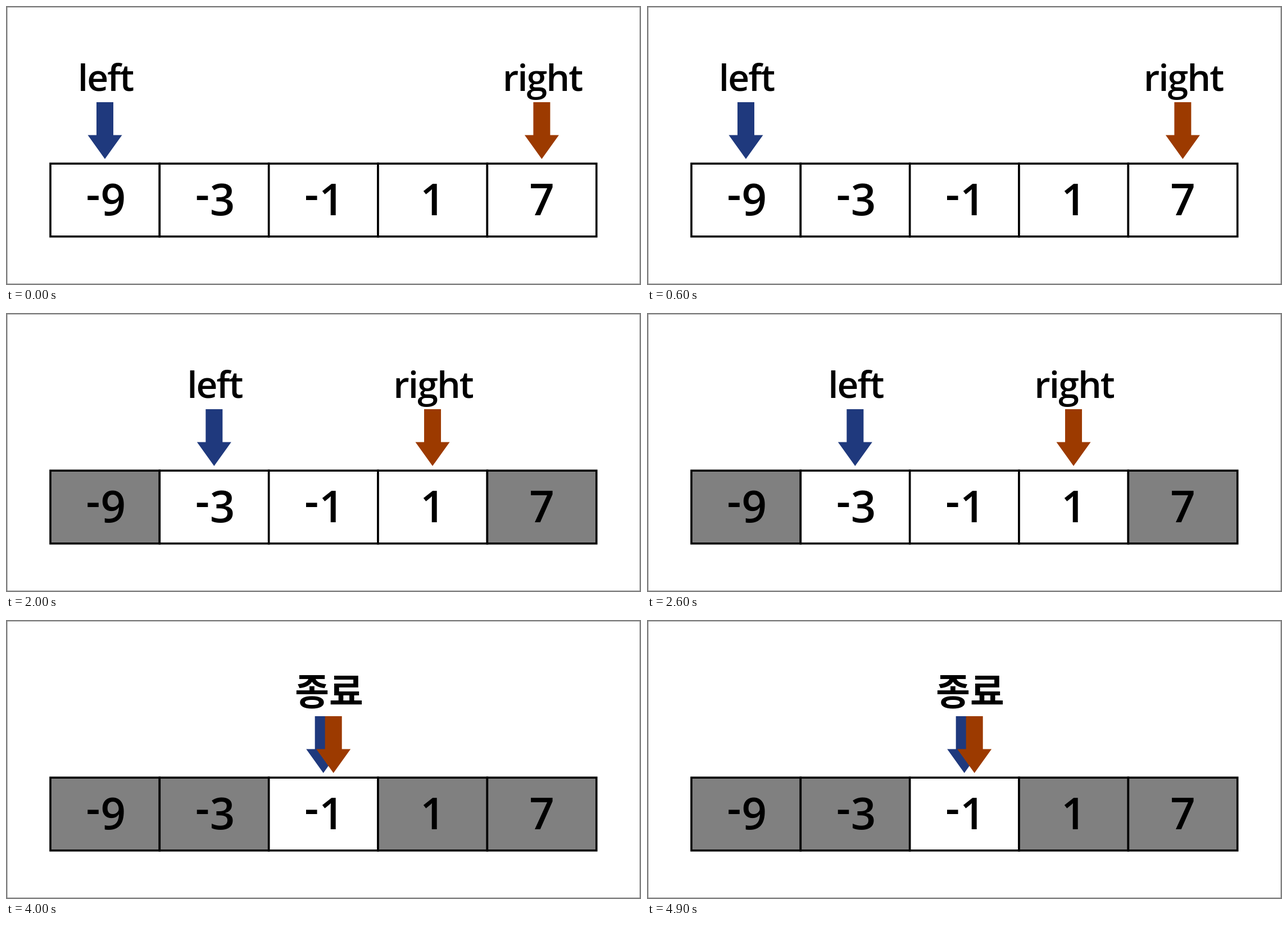
Recreate the animation shown at these times as an HTML page. Size 1130 by 496 pixels, loop 5500 ms.

```html
<!DOCTYPE html>
<html lang="ko">
<head>
<meta charset="utf-8">
<title>Two pointers</title>
<style>
  html, body { margin: 0; width: 100%; height: 100%; overflow: hidden; background: #fff; }
  svg { display: block; }
  text { font: 600 66px "Open Sans", "Noto Sans", sans-serif; }
  .label { letter-spacing: -2px; }
  .digit { font-size: 78px; }
  .end { font: 700 66px "Noto Sans CJK KR", "Noto Sans CJK", sans-serif; }
</style>
</head>
<body>
<svg id="stage" width="1130" height="496" viewBox="0 0 1130 496">
  <rect x="1.25" y="1.25" width="1127.5" height="493.5" fill="none" stroke="#808080" stroke-width="2.5"/>
</svg>
<script>
const values = [-9, -3, -1, 1, 7];
const steps = [
  { at: 0, left: 0, right: 4 },
  { at: 1000, left: 1, right: 4 },
  { at: 2000, left: 1, right: 3 },
  { at: 3000, left: 2, right: 3 },
  { at: 4000, left: 2, right: 2 },
];
const LOOP = 5500, CELL = 194.35;
const stage = document.getElementById("stage");

function add(parent, tag, attrs, text = "") {
  const node = document.createElementNS("http://www.w3.org/2000/svg", tag);
  for (const name in attrs) node.setAttribute(name, attrs[name]);
  node.textContent = text;
  return parent.appendChild(node);
}

const cells = values.map((value, i) => {
  const x = 79 + i * CELL;
  const cell = add(stage, "rect", { x, y: 280.2, width: CELL, height: 129.6, stroke: "#000", "stroke-width": 3.6 });
  const center = x + CELL / 2 + (value < 0 ? 14.5 : 0);
  if (value < 0) add(stage, "text", { class: "digit", x: center - 23, y: 362, "text-anchor": "end" }, "-");
  add(stage, "text", { class: "digit", x: center, y: 371.5, "text-anchor": "middle" }, Math.abs(value));
  return cell;
});

function pointer(name, color) {
  const group = add(stage, "g", {});
  add(group, "path", { d: "M161 171h30v58.5h15.5L176 272 145.5 229.5H161z", fill: color });
  const label = add(group, "text", { class: "label", x: 177, y: 151, "text-anchor": "middle" }, name);
  return { group, label };
}

const left = pointer("left", "#1f397d");
const right = pointer("right", "#9c3a00");
const end = add(stage, "text", { class: "end", x: 575, y: 151, "text-anchor": "middle" }, "종료");

function draw(now) {
  const time = now % LOOP;
  const step = steps.findLast(s => s.at <= time);
  const done = step.left === step.right;
  cells.forEach((cell, i) =>
    cell.setAttribute("fill", i < step.left || i > step.right ? "#808080" : "#fff"));
  left.group.setAttribute("transform", `translate(${step.left * CELL})`);
  right.group.setAttribute("transform", `translate(${step.right * CELL + (done ? 18 : 0)})`);
  for (const { label } of [left, right]) label.setAttribute("visibility", done ? "hidden" : "visible");
  end.setAttribute("visibility", done ? "visible" : "hidden");
  requestAnimationFrame(draw);
}
draw(performance.now());
</script>
</body>
</html>
```
